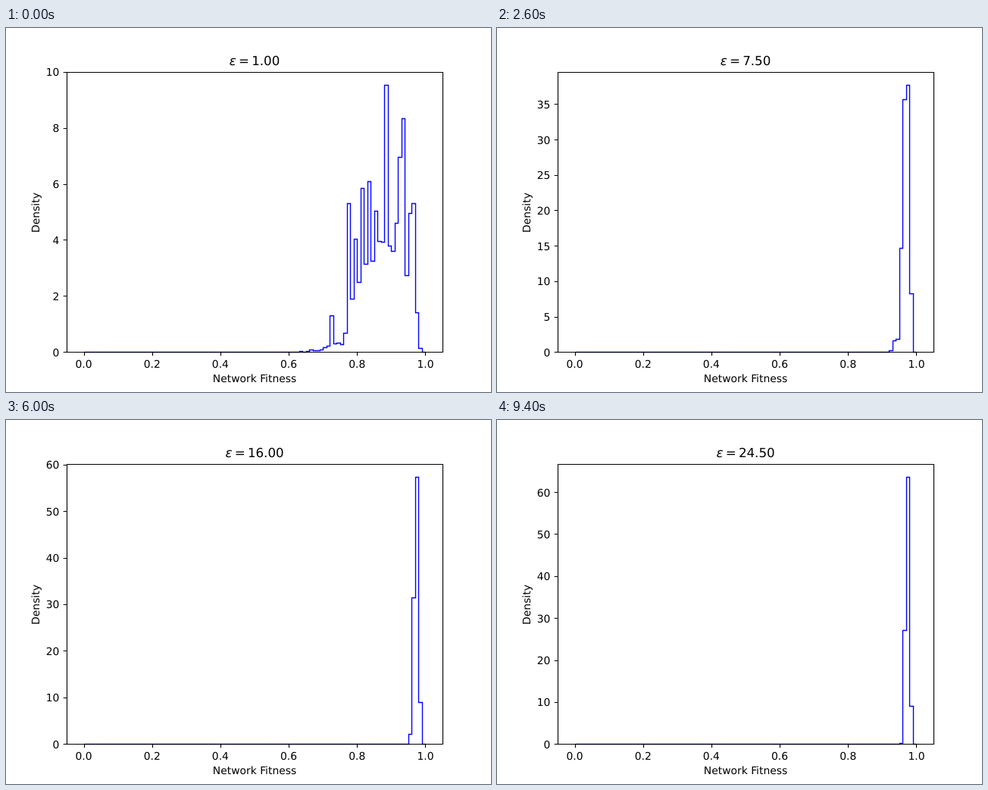
Recreate the animation shown at these times as an HTML page. Size 640x480 px, loop 9600 ms.

```html
<!DOCTYPE html>
<html lang="en">
<head>
<meta charset="utf-8">
<title>Network fitness density</title>
<style>
  html, body { margin: 0; width: 100%; height: 100%; overflow: hidden; background: #fff; }
  svg { display: block; width: 640px; height: 480px; }
  text { font: 13.889px "DejaVu Sans", sans-serif; text-rendering: geometricPrecision; }
  .mid { text-anchor: middle; }
  .end { text-anchor: end; }
  #title text { font-size: 16.667px; }
  #title .eps { font-style: italic; }
  path { fill: none; stroke: #000; stroke-width: 1.11; }
  #curve { stroke: #00f; stroke-width: 1.389; stroke-miterlimit: 10; }
</style>
</head>
<body>
<svg viewBox="0 0 640 480">
  <path id="curve"/>
  <path d="M80.5 58.5H576.5V427.5H80.5Z"/>
  <path id="ticks"/>
  <g id="xLabels"></g>
  <g id="yLabels"></g>
  <text class="mid" x="328" y="467">Network Fitness</text>
  <text class="mid" id="yTitle">Density</text>
  <g id="title">
    <text class="eps" y="49">ε</text><text y="49">=</text><text y="49"></text>
  </g>
</svg>
<script>
const $ = id => document.getElementById(id);
const STEP = 200, STEPS = 48;
const BASE = 427.2, HEIGHT = 369.6, LAST_BIN = 98;

// Densities of the bins ending at 0.98, sampled at a few epsilons.
const samples = [
  [1, [.03, .01, .03, .08, .05, .05, .1, .16, .22, 1.3, .3, .33, .27, .68, 5.3, 1.9, 4.05, 2.5,
       5.84, 3.14, 6.11, 3.25, 5.03, 3.95, 3.92, 9.53, 3.8, 3.6, 4.62, 6.95, 8.35, 2.74, 4.97, 5.3, 1.41, .14]],
  [2.5, [.2, .07, .2, .28, .52, .6, .75, 3.04, 1.87, 2.12, 4.77, 9.45, 15.1, 8.05, 16.8, 22.6, 12, 1.55]],
  [5.5, [.1, .45, 1.8, 4.83, 4.15, 18.6, 34.6, 29, 6.55]],
  [10, [.3, .45, 9.45, 34.95, 46.2, 8.7]],
  [16, [2.15, 31.5, 57.35, 9]],
  [19.5, [1.05, 29.3, 60.65, 9.05]],
  [24.5, [.25, 27.1, 63.6, 9.05]]
];
const count = samples[0][1].length, firstBin = LAST_BIN - count + 1;
const knots = samples.map(s => Math.sqrt(s[0]));

// Log density per bin and sample; bins that died out keep decaying.
const logs = Array.from({ length: count }, (_, i) => {
  let prev = 0;
  return samples.map(([, d]) => {
    const v = d[i - count + d.length];
    return prev = v ? Math.log(v) : prev - 5;
  });
});

function tangents(y) {
  const n = y.length, m = [];
  const slope = i => (y[i + 1] - y[i]) / (knots[i + 1] - knots[i]);
  for (let i = 1; i < n - 1; i++) {
    const a = knots[i] - knots[i - 1], b = knots[i + 1] - knots[i];
    m[i] = (slope(i - 1) * b + slope(i) * a) / (a + b);
  }
  m[0] = 2 * slope(0) - m[1];
  m[n - 1] = 2 * slope(n - 2) - m[n - 2];
  return m;
}
const tans = logs.map(tangents);

function densities(eps) {
  const x = Math.sqrt(eps);
  let k = 0;
  while (k < knots.length - 2 && x >= knots[k + 1]) k++;
  const h = knots[k + 1] - knots[k], u = (x - knots[k]) / h, w = 1 - u;
  const raw = logs.map((y, i) => Math.exp(
    y[k] * w * w * (1 + 2 * u) + y[k + 1] * u * u * (3 - 2 * u) +
    h * u * w * (tans[i][k] * w - tans[i][k + 1] * u)));
  const sum = raw.reduce((a, b) => a + b);
  return raw.map(v => v * 100 / sum);
}

const snap = v => Math.floor(v + .5) + .5;
const xAt = v => 80 + 496 * (v + .05) / 1.1;
const label = (cls, x, y, s) => `<text class="${cls}" x="${x}" y="${y}">${s}</text>`;
const textWidth = s => [...s].reduce((w, c) => w + (c === '.' ? 4.415 : 8.837), 0);

const xValues = [0, .2, .4, .6, .8, 1];
const xTicks = xValues.map(v => `M${snap(xAt(v))} 427.5v4.86`).join('');
$('xLabels').innerHTML = xValues.map(v => label('mid', xAt(v), 448, v.toFixed(1))).join('');

function tickStep(max) {
  const raw = max / 9;
  return [1, 2, 2.5, 5, 10, 20].find(s => s >= raw);
}

function draw(eps) {
  const bars = densities(eps);
  const max = Math.max(...bars) * 1.05;
  const yAt = v => BASE - HEIGHT * v / max;

  let d = `M${snap(xAt(0))} 427.5`;
  bars.forEach((v, i) => {
    d += `H${snap(xAt((firstBin + i) / 100))}V${snap(yAt(v))}`;
  });
  $('curve').setAttribute('d', d + `H${snap(xAt(.99))}V427.5H${snap(xAt(1))}`);

  const step = tickStep(max), digits = step === 2.5 ? 1 : 0;
  let ticks = xTicks, labels = '', width = 0;
  for (let v = 0; v <= max; v += step) {
    const y = yAt(v), s = v.toFixed(digits);
    ticks += `M80.5 ${snap(y)}h-4.86`;
    labels += label('end', 70.3, Math.round(y + 5.4), s);
    width = Math.max(width, textWidth(s));
  }
  $('ticks').setAttribute('d', ticks);
  $('yLabels').innerHTML = labels;
  $('yTitle').setAttribute('transform',
    `translate(${Math.round(61.8 - width)} 243.5) rotate(-90)`);

  const value = eps.toFixed(2), parts = $('title').children;
  const left = 328 - (29.5 + textWidth(value) * 1.2) / 2;
  [0, 12.25, 29.5].forEach((dx, i) => parts[i].setAttribute('x', left + dx));
  parts[2].textContent = value;
}

const start = performance.now();
let shown = -1;
function tick() {
  const k = Math.floor((performance.now() - start) / STEP) % STEPS;
  if (k !== shown) draw(1 + (shown = k) / 2);
  requestAnimationFrame(tick);
}
tick();
</script>
</body>
</html>
```
